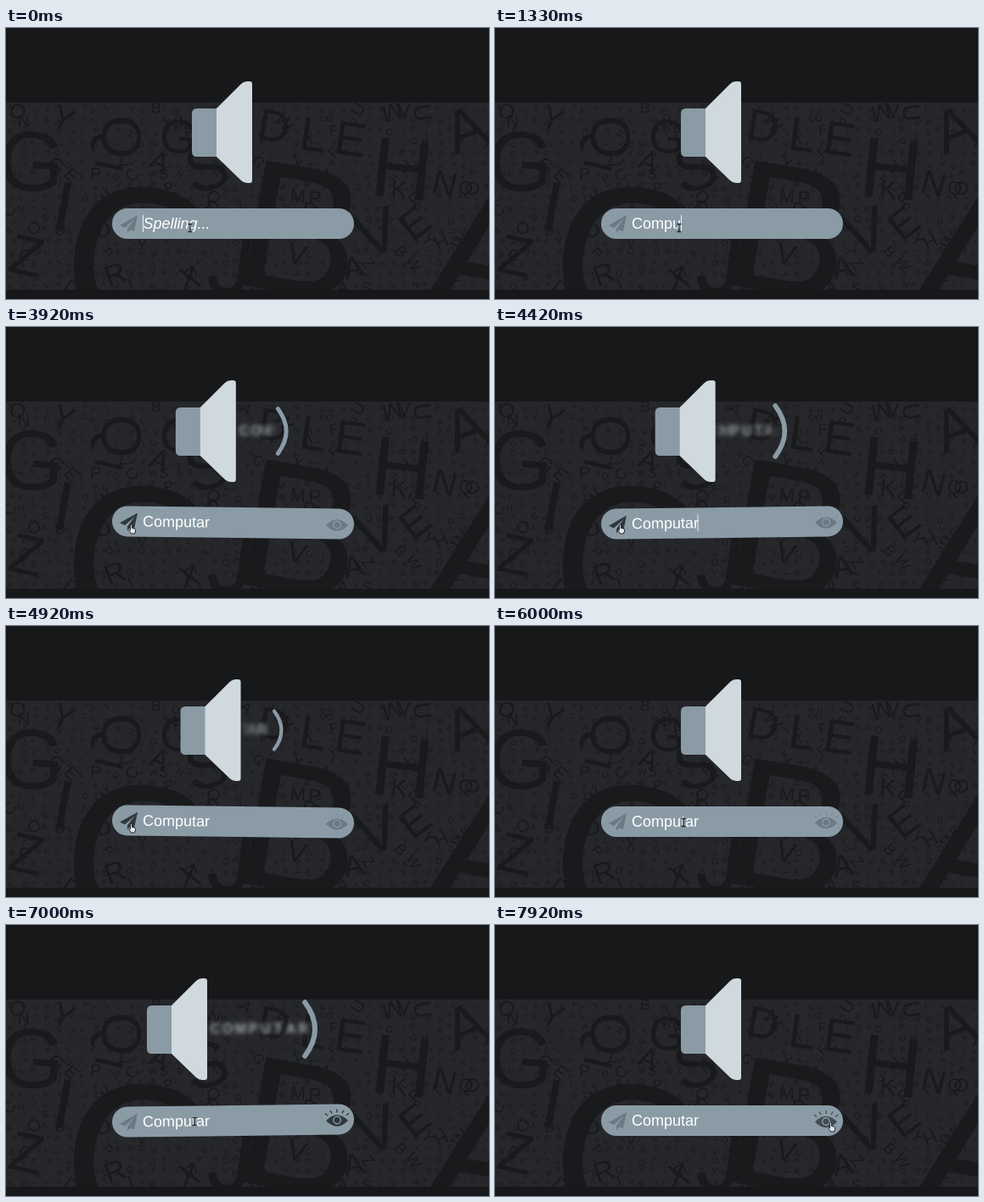
Recreate the animation shown at these times as an HTML page. Size 569x320 px, loop 8000 ms.

```html
<!DOCTYPE html>
<html lang="en">
<head>
<meta charset="utf-8">
<title>Spelling speaker</title>
<style>
html, body { margin: 0; width: 100%; height: 100%; overflow: hidden; background: #17181a; }
svg { display: block; width: 100vw; height: 100vh; font-family: "Liberation Sans", Arial, sans-serif; }
#cloud text { text-anchor: middle; }
#spell text { text-anchor: middle; font-weight: bold; font-size: 16px; fill: #d3dade; }
</style>
</head>
<body>
<svg viewBox="0 0 569 320">
  <defs>
    <clipPath id="panel"><rect y="88" width="569" height="221"/></clipPath>
    <filter id="soft" x="-50%" y="-150%" width="200%" height="400%"><feGaussianBlur stdDeviation="2.6"/></filter>
  </defs>
  <rect width="569" height="320" fill="#17181a"/>
  <rect y="88" width="569" height="221" fill="#26272b"/>
  <g id="cloud" clip-path="url(#panel)" fill="#191a1c"></g>

  <g id="spell" filter="url(#soft)"></g>
  <g id="speaker">
    <path d="M249 95H225Q219 95 219 101V146Q219 152 225 152H249Z" fill="#8a9ba5"/>
    <path d="M248 95L277 66Q280 63 284 63H287Q290 63 290 66V180Q290 183 287 183H284Q280 183 277 180L248 152Z" fill="#cfd9de"/>
  </g>
  <path id="wave" d="M-12-32Q12 0-12 32" fill="none" stroke="#8a9ba5" stroke-width="6" stroke-linecap="round"/>

  <g id="bar">
    <rect x="125" y="213" width="285" height="36" rx="18" fill="#8a9ba6"/>
    <path id="plane" d="M155 221L134 233L140 236L152 225L143 237V242L146 238.500L151 240Z"/>
    <text id="hint" x="161.500" y="237" font-size="18" font-style="italic" fill="#fff">Spelling...</text>
    <text id="word" x="161" y="237" font-size="18" fill="#fff"></text>
    <rect id="caret" y="221" width="1" height="20" fill="#fff"/>
    <g id="eye">
      <path d="M377 232.500Q390 219 403 232.500Q390 246 377 232.500Z"/>
      <circle cx="390" cy="232" r="5" fill="#8a9ba6"/>
      <circle cx="390" cy="232" r="3.600"/>
      <path id="lashes" d="M376 224l3 2.500M382 220.500l2 3.500M390 219v4M398 220.500l-2 3.500M404 224l-3 2.500" fill="none" stroke-width="1.300"/>
    </g>
  </g>

  <path id="beam" d="M-2.500-4.500H2.500M0-4.500V4.500M-2.500 4.500H2.500" fill="none" stroke="#23272a" stroke-width="1.300"/>
  <path id="hand" d="M-2.500-5Q-1.500-6-.5-5V-1.500L3-.8Q4 0 3.500 2L2.500 5H-1.500L-4 1.500Q-4 0-2.500 .8Z" fill="#e4e8ea" stroke="#23272a"/>
</svg>
<script>
const $ = id => document.getElementById(id);
const LOOP = 8000, WORD = "Computar", CELL = 13.25;
const keyTimes = [420, 580, 750, 1000, 1330, 1670, 1750, 2080];
const plays = [
  { start: 3310, life: 1200, gap: 130, ramp: 2 },
  { start: 6420, life: 1400, gap: 10, ramp: 3 }
];

const clamp = v => Math.max(0, Math.min(1, v));
const smooth = v => { v = clamp(v); return v * v * (3 - 2 * v); };
const step = (t, a, b) => smooth((t - a) / (b - a));
const mix = (a, b, k) => a + (b - a) * k;
const shade = k => `rgb(${mix(107, 48, k)},${mix(121, 55, k)},${mix(131, 61, k)})`;
const set = (el, attrs) => { for (const k in attrs) el.setAttribute(k, attrs[k]); };

function addText(parent, str) {
  const el = document.createElementNS("http://www.w3.org/2000/svg", "text");
  el.textContent = str;
  return parent.appendChild(el);
}

// Letter wallpaper: placed capitals plus a seeded scatter in the gaps
function letter(ch, x, y, size, rot) {
  set(addText($("cloud"), ch), {
    "font-size": size, y: size * 0.36,
    transform: `translate(${x} ${y}) rotate(${rot})`
  });
}
const capitals = [
  ["G", 30, 156, 100, 4], ["C", 157, 270, 245, 8], ["B", 348, 236, 218, 10],
  ["A", 575, 262, 225, 10], ["H", 467, 165, 100, 6], ["I", 68, 210, 84, 10],
  ["Z", 25, 268, 66, 12], ["Q", 137, 129, 66, 95], ["G", 203, 127, 56, 8],
  ["S", 236, 164, 76, -15], ["D", 316, 115, 52, 10], ["L", 362, 125, 56, 8],
  ["E", 406, 130, 56, 8], ["A", 541, 118, 70, -22], ["V", 436, 240, 74, -20],
  ["E", 481, 230, 48, -38], ["N", 517, 183, 40, 14], ["I", 122, 163, 48, 103],
  ["J", 266, 276, 108, 8], ["A", 181, 157, 32, 22], ["Y", 68, 106, 38, 22],
  ["O", 14, 98, 25, 20], ["K", 463, 190, 28, 5], ["R", 128, 290, 34, -20],
  ["X", 216, 294, 36, -15], ["V", 343, 266, 34, 15], ["A", 409, 282, 36, -12],
  ["M", 455, 100, 28, 165], ["U", 491, 100, 28, 80], ["D", 115, 238, 24, -10],
  ["P", 364, 200, 22, 4], ["M", 344, 198, 22, 4]
];
let seed = 11;
const rnd = () => (seed = (seed * 16807) % 2147483647) / 2147483647;
for (let y = 93; y < 312; y += 13)
  for (let x = 3; x < 569; x += 14) {
    const ch = String.fromCharCode(65 + Math.floor(rnd() * 26));
    const big = rnd() < 0.08;
    letter(ch, (x + rnd() * 7).toFixed(1), (y + rnd() * 6).toFixed(1),
      Math.round(big ? 16 + rnd() * 7 : 6 + rnd() * 5), Math.round(rnd() * 120 - 60));
  }
capitals.forEach(c => letter(...c));

const glyphs = [...WORD.toUpperCase()].map(c => addText($("spell"), c));
glyphs.forEach(g => g.setAttribute("y", 128));

// Share of its full width that letter i takes at time t
function open(i, t) {
  return Math.max(...plays.map(p => {
    const k = (t - p.start - i * p.gap) / p.life;
    return smooth(p.ramp * Math.min(k, 1 - k));
  }));
}

const moves = [[3260, 3450, -68, 3], [5030, 5450, 73, -7], [7300, 7680, 175, 7]];
function pointer(t) {
  return moves.reduce(([x, y], [a, b, dx, dy]) => {
    const k = step(t, a, b);
    return [x + dx * k, y + dy * k];
  }, [217, 236]);
}

function drawSound(t) {
  const sizes = glyphs.map((_, i) => open(i, t));
  const d = sizes.reduce((a, b) => a + b, 0) * CELL / 2;
  $("speaker").setAttribute("transform", `translate(${-d} 0)`);
  let run = 0;
  glyphs.forEach((g, i) => {
    const w = sizes[i] * CELL;
    set(g, { x: 292 - d + 1.12 * (run + w / 2), opacity: 0.72 * sizes[i] });
    run += w;
  });
  const scale = 1 - Math.exp(-d / 11);
  set($("wave"), {
    transform: `translate(${311 + d} 123) scale(${scale})`,
    opacity: clamp(d / 6)
  });
  const tilt = -0.9 * clamp(d / 6) * Math.sin(2 * Math.PI * t / 331);
  $("bar").setAttribute("transform", `rotate(${tilt} 267.5 231)`);
}

const advance = [13, 10, 15, 10, 10, 5, 10, 6];
function drawInput(t) {
  const typed = keyTimes.filter(k => t >= k).length;
  const last = typed ? keyTimes[typed - 1] : 0;
  $("word").textContent = WORD.slice(0, typed);
  $("hint").setAttribute("opacity", typed ? 0 : 1);
  const x = 161 + advance.slice(0, typed).reduce((a, b) => a + b, 0);
  const lit = t < 6250 && (t - last) % 1000 < 500;
  set($("caret"), { x: Math.min(x, 238.5), opacity: lit ? 0.85 : 0 });

  const hover = step(t, 3350, 3550) * (1 - step(t, 5000, 5400));
  $("plane").setAttribute("fill", shade(hover));
  const focus = step(t, 6250, 6500) * (1 - 0.3 * step(t, 7250, 7900));
  const tone = shade(focus);
  set($("eye"), { opacity: step(t, 3280, 3500), fill: tone });
  set($("lashes"), {
    stroke: tone,
    opacity: 0.2 + 0.3 * step(t, 5300, 5600) + 0.5 * step(t, 6250, 6500)
  });
}

function drawPointer(t) {
  const [x, y] = pointer(t);
  const onIcon = x < 158 || x > 376;
  for (const id of ["beam", "hand"])
    set($(id), {
      transform: `translate(${x} ${y})`,
      opacity: (id === "hand") === onIcon ? 1 : 0
    });
}

function render(t) {
  drawSound(t);
  drawInput(t);
  drawPointer(t);
}

const begin = performance.now();
function tick() {
  render((performance.now() - begin) % LOOP);
  requestAnimationFrame(tick);
}
render(0);
requestAnimationFrame(tick);
</script>
</body>
</html>
```
